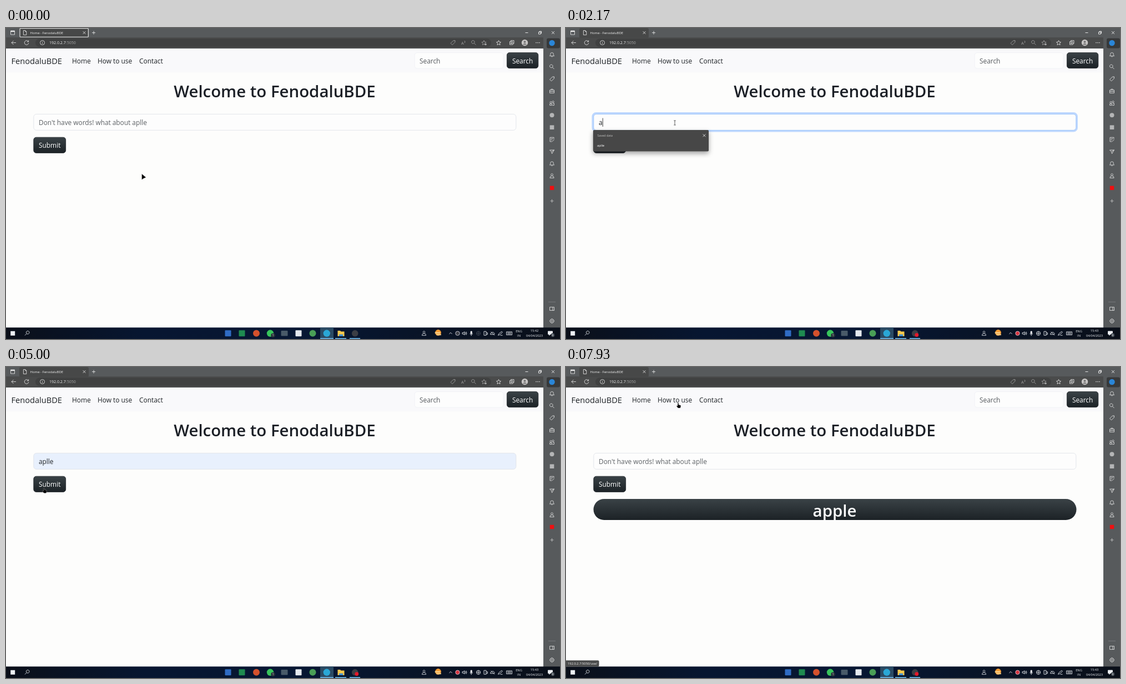
These frames come from a looping animation (998 px wide and 561 px high, 8 s). An HTML page:

```html
<!DOCTYPE html>
<html lang="en">
<head>
<meta charset="utf-8">
<title>Spelling page</title>
<style>
html, body { margin: 0; width: 100%; height: 100%; overflow: hidden; background: #fdfdfc; }
svg { display: block; width: 100%; height: 100%; }
text { font-family: "Open Sans", "Noto Sans", sans-serif; white-space: pre; }
</style>
</head>
<body>
<svg id="stage" viewBox="0 0 998 561">
  <defs>
    <linearGradient id="dark" x2="0" y2="1">
      <stop stop-color="#3a4246"/><stop offset="1" stop-color="#1c2226"/>
    </linearGradient>
    <linearGradient id="bar">
      <stop stop-color="#0a0f19"/><stop offset=".25" stop-color="#071631"/>
      <stop offset=".55" stop-color="#071733"/><stop offset="1" stop-color="#0a0f18"/>
    </linearGradient>
    <filter id="shadow" x="-10%" y="-20%" width="120%" height="150%">
      <feDropShadow dx="0" dy="4" stdDeviation="4" flood-opacity=".36"/>
    </filter>
  </defs>
  <g id="page"></g>
  <g id="chrome"></g>
  <g id="over"></g>
</svg>
<script>
const LOOP = 8000;
const SITE = "FenodaluBDE", HOST = "192.0.2.7", PORT = ":5050";
const FOCUS = 1035, TYPE = 2060, PICK = 3690, BLUR = 4700, RELOAD = 5350;
const FRAME = "#575a5c";
const $ = id => document.getElementById(id);

// Markup helpers
const rect = (x, y, w, h, fill, rx = 0, more = "") =>
  `<rect x="${x}" y="${y}" width="${w}" height="${h}" rx="${rx}" fill="${fill}" ${more}/>`;
const disc = (x, y, r, fill, more = "") => `<circle cx="${x}" cy="${y}" r="${r}" fill="${fill}" ${more}/>`;
const text = (x, y, size, fill, str, more = "") =>
  `<text x="${x}" y="${y}" font-size="${size}" fill="${fill}" ${more}>${str}</text>`;
const icon = (x, y, d, color = "#e4e4e4", more = "") =>
  `<path transform="translate(${x} ${y})" d="${d}" fill="none" stroke="${color}" stroke-width=".85" stroke-linejoin="round" ${more}/>`;
const mid = 'text-anchor="middle"';
const bold = 'text-anchor="middle" font-weight="600"';
const button = (x, y, w, label) =>
  rect(x, y, w, 28.2, "url(#dark)", 4.6, 'stroke="#1d2226" stroke-width=".8"') +
  text(x + w / 2, y + 19.2, 11.9, "#fff", label, mid);

// Small line drawings, centred on 0,0
const ring = r => `M${-r} 0a${r} ${r} 0 1 0 ${2 * r} 0a${r} ${r} 0 1 0 ${-2 * r} 0`;
const I = {
  cross: "M-2.4-2.4L2.4 2.4M2.4-2.4L-2.4 2.4",
  plus: "M-3 0H3M0-3V3",
  box: "M-3.5-3.5H3.5V3.5H-3.5Z",
  back: "M4 0H-4M-.5-3.5L-4 0L-.5 3.5",
  reload: "M3.4-1.8A3.8 3.8 0 1 0 3.8.6M3.6-4.2V-1.6H1",
  info: ring(4) + "M0-.5V2M0-2.2V-1.4",
  tag: "M-4 1L1-4H4V-1L-1 4ZM2.2-2.4v.6",
  lens: "M-1.2-4a2.8 2.8 0 1 0 .01 0M.8.8L4 4",
  star: "M0-4L1.2-1.3L4-1L2 1L2.5 4L0 2.5L-2.5 4L-2 1L-4-1L-1.2-1.3Z",
  bell: "M-4 2.2H4L2.8.5V-1A2.8 2.8 0 0 0-2.8-1V.5ZM-1 3.6H1",
  kit: "M-4-1.8H4V3.5H-4ZM-1.6-1.8V-3.5H1.6V-1.8M-4 .8H4",
  people: "M-3.8 3.8V1H-.2V3.8ZM-2-3a1.5 1.5 0 1 0 .01 0M.8 3.8H3.8V0H1.4M2-4a1.5 1.5 0 1 0 .01 0",
  edit: "M3.5-1V-3.8H-3.5V3.8H0M-2-1.5H2M-2 .8H0M4 0L.5 3.6",
  plane: "M-4-2.8L4-3L0 3.8L-1 .4ZM-1 .4L4-3",
  person: "M0-4a1.8 1.8 0 1 0 .01 0M-3.6 3.8Q-3.6 0 0 0T3.6 3.8Z",
  panel: "M-4-3H4V3H-4ZM1.4-3V3",
  gear: ring(3.5) + ring(1.3) + "M0-4.5V-3.5M0 3.5V4.5M-4.5 0H-3.5M3.5 0H4.5",
  trash: "M-4-3H4M-3-3L-2.5 4H2.5L3-3M-1.2-3V-4.3H1.2V-3M-.9-1V2M.9-1V2",
  sheet: "M-2.6-4H.8L2.8-2V4H-2.6ZM.8-4V-2H2.8",
  copies: "M-3.5-2H2V3.5H-3.5ZM-1.5-2V-4H4V1.5H2M-.8-1V2.5M-2.5.8H1",
  speaker: "M-4-1.2H-2L0-3V3L-2 1.2H-4ZM1.5-1.8Q3 0 1.5 1.8M2.8-3Q5.2 0 2.8 3",
  globe: ring(3.6) + "M-3.6 0H3.6M0-3.6V3.6",
  cloud: "M-4 2H3Q5 .5 2.5-.8Q1-3.5-1.5-1.2Q-4-1-4 2ZM-3-3L3.5 3.5",
  pen: "M-4 3.5L-2.5.5L2.5-3.5L4-2L-1 2.5ZM0 3.5H4",
  keys: "M-5-2.8H5V2.8H-5ZM-3.5-1H3.5M-3.5 1H3.5",
  note: "M-4-3.5H4V2H0L-2 4V2H-4Z"
};

function drawPage() {
  const ink = "#1d2125", nav = (x, s) => text(x, 63.8, 11.9, ink, s);
  $("page").innerHTML =
    rect(0, 36, 969, 505, "#fdfdfc") + rect(0, 36, 969, 44.5, "#f9f9fb") +
    text(9.5, 64.8, 14.6, ink, SITE) +
    nav(119, "Home") + nav(165, "How to use") + nav(240, "Contact") +
    rect(736, 44.5, 160, 28.5, "#fdfdfd", 5, 'stroke="#eeeff4" stroke-width=".8"') +
    text(745, 63.8, 11.9, "#55595d", "Search") + button(902.4, 44.4, 56.4, "Search") +
    text(484, 124.7, 29.4, "#1b1f26", "Welcome to " + SITE, bold) +
    button(49.8, 197.2, 57.8, "Submit") +
    `<g id="result">` + rect(49.5, 238, 870, 38, "url(#dark)", 19) +
    text(484, 270, 29.4, "#fdfdfd", "apple", bold) + `</g>` +
    `<rect id="glow" x="48.2" y="153.7" width="872" height="32.2" rx="6" fill="none" stroke="#bdd7fe" stroke-width="3.4"/>` +
    `<rect id="field" x="49.8" y="155.4" width="869" height="29" rx="5" stroke-width=".8"/>` +
    `<text id="value" x="59" y="175" font-size="11.85"></text>` +
    rect(0, 162.5, 0.8, 15.5, "#111", 0, 'id="caret"');
}

function drawTop() {
  const light = "#e8e8e8", dim = "#a2a2a2";
  return rect(0, 0, 998, 37, FRAME) + rect(0, 17, 968, 19.6, "#4a4b4b") +
    rect(24, 0, 125, 18, "#474848", 3) +
    rect(25, .7, 123.3, 15.6, "none", 1, 'id="tabLine" stroke="#f4f4f4" stroke-width="1.1"') +
    icon(12, 8.5, I.box, light) + rect(8.5, 5, 7, 2, light) + icon(34, 8.5, I.sheet, light) +
    text(43.5, 10.6, 6, "#f3f3f3", "Home - " + SITE) +
    icon(141, 8.5, I.cross, light) + icon(158, 8.5, I.plus, light) +
    icon(938, 8.5, "M-2.5 0H2.5", "#fff") +
    icon(962, 8.5, "M-2.5-1.2H1.2V2.5H-2.5ZM-1-1.2V-2.5H2.5V1H1.2", "#fff") + icon(985.5, 8.5, I.cross, "#fff") +
    rect(53, 19.2, 821, 15, "#404141", 7.5) +
    icon(14, 26.5, I.back, light) + icon(37, 26.5, I.reload, light) + icon(65.5, 26.5, I.info, light) +
    text(78, 29.2, 7.05, "#f2f2f2", `${HOST}<tspan fill="#aaa">${PORT}</tspan>`) +
    icon(805, 26.5, I.tag, dim) + text(820, 29.5, 7.5, dim, "A") + icon(827, 25, "M-1-2Q1 0-1 2", dim) +
    icon(842.5, 26.5, I.lens, dim) + icon(861, 26.5, I.star, dim) + disc(864, 29.5, 1.8, dim) +
    icon(887.5, 26.5, I.star, light) + icon(911, 26.5, I.copies, light) +
    disc(934.5, 26.5, 5.7, "#c9c7c6") + disc(934.5, 25, 2, "#777") +
    `<path d="M930.8 30.2Q934.5 25.5 938.2 30.2Z" fill="#777"/>` +
    [955, 958, 961].map(x => disc(x, 26.5, .8, light)).join("");
}

function drawSide() {
  const names = ["bell", "lens", "tag", "kit", "people", 0, 0, "edit", "plane", "bell", "person"];
  return rect(968, 36, 30, 505, FRAME) + rect(974, 18.5, 24, 18, "#37393a", 3) +
    disc(983.5, 27, 5.2, "#2a86d8") +
    names.map((n, i) => n ? icon(983.5, 48.2 + i * 21.85, I[n]) : "").join("") +
    disc(983.5, 157.3, 4, "#b4b5b6") + rect(979.7, 175.4, 7.6, 7.6, "#b4b5b6") +
    rect(979.8, 284.8, 7.4, 7.4, "#f00f10") +
    icon(983.5, 312, I.plus, "#c4c4c4") + rect(977, 493.8, 13, .7, "#85888a") +
    icon(983.5, 506.5, I.panel) + icon(983.5, 528.5, I.gear);
}

function drawTaskbar() {
  const y = 550.8, white = "#eef1f5", tile = (x, c) => rect(x - 5.5, y - 5.5, 11, 11, c, 1);
  const label = (x, y, s, id = "") => text(x, y, 5.7, white, s, `${mid} ${id && `id="${id}"`}`);
  return rect(0, 540.3, 998, 20.7, "url(#bar)") +
    rect(566, 540.3, 24, 20.7, "#2b4b64") +
    [[566, 24], [593, 20], [619, 19]].map(([x, w]) => rect(x, 559.3, w, 1.7, "#69b3e4")).join("") +
    rect(8.2, 546.8, 8, 8, white) + icon(38, 550.5, "M1.2-4a2.8 2.8 0 1 0 .01 0M-.8.8L-4 4", white) +
    tile(400, "#2f6cc4") + tile(425, "#1e8b50") + disc(451, y, 6, "#d4512c") +
    disc(476, y, 6.2, "#37c45b") + disc(481, 554.3, 3.8, "#2b343b") + text(481, 556.2, 5.3, "#fff", "1", mid) +
    rect(495.5, 546, 12, 9.5, "#495a68", 1) + tile(527, "#e5e9ee") +
    disc(552.5, y, 6, "#4a9f56") + disc(577.8, y, 6.2, "#2aa7d6") +
    `<path d="M597.5 546h4.5l1.5 1.5h6v8.5h-12z" fill="#f6c84c"/>` + rect(600, 552.6, 7, 3.4, "#428fd2") +
    disc(628.7, y, 5.8, "#3b3e45") + disc(631.8, 553.7, 3.4, "#e3182b", 'id="rec"') +
    icon(753, y, I.person, white, 'opacity=".9"') +
    disc(778.5, 549.5, 5.4, "#f59b32") + rect(772.5, 548.7, 10, 2.2, "#f8d28e", 1.1) + rect(775, 552.2, 9, 2, "#f8d28e", 1) +
    icon(801, y, "M-2.6 1.2L0-1.4L2.6 1.2", white) +
    disc(813.5, y, 3.7, "#3b3e45", 'id="tray" stroke="#dde" stroke-width=".8"') +
    icon(826, y, I.speaker, white) + rect(836.6, 546.4, 3.2, 5.8, white, 1.6) +
    icon(838.2, y, "M-2.6.4Q0 4.5 2.6.4M0 2.4V4.4", white) +
    `<g id="net">` + icon(851, y, I.globe, white) + `</g>` +
    icon(864, y, "M-3-3.5H1V3.5H-3ZM1-1H3.5V2H1", white) + icon(876.5, y, I.cloud, white) +
    icon(890.5, y, I.pen, white) + icon(906.5, y, I.keys, white) +
    label(924, 548.6, "ENG") + label(924, 557.2, "IN") +
    label(952, 548.4, "15:42", "clock") + label(952, 557.2, "04/04/2023") +
    icon(980.5, 550.5, I.note, white, 'style="fill:#eef1f5"') +
    disc(985, 554, 3.4, "#3a424b") + text(985, 556, 5.2, "#fff", "6", mid);
}

function drawOver() {
  $("over").innerHTML =
    `<g id="tip">` + rect(24, 18.5, 145.5, 28.5, "#4a4a4a", 2, 'filter="url(#shadow)"') +
    text(28.5, 27.4, 6, "#fff", "Home - " + SITE) + icon(33, 38, I.sheet, "#fff") +
    text(41, 40.5, 5.9, "#fff", HOST + PORT) + `</g>` +
    `<g id="list">` + rect(48.8, 184, 208.3, 127, "#474746", 2, 'id="listBox" filter="url(#shadow)"') +
    text(56.5, 196, 5.4, "#c4c4c2", "Saved data") + icon(249, 193.8, I.cross, "#eee") +
    `<g id="hover">` + rect(53.5, 203, 181.5, 18, "#6b6b6d", 1.5) + rect(53.5, 220.3, 181.5, .9, "#77749c") +
    icon(245.3, 211.8, I.trash, "#ddd") + `</g>` +
    ["aplle", "baal", "beel", "gadha", "cta", "dgo"].map((w, i) =>
      text(56, 214 + i * 17.65, 5.9, "#fff", w, i ? 'class="rest"' : "")).join("") + `</g>` +
    `<g id="status">` + rect(-3, 529.3, 62.5, 11, "#4b4c4c", 2) +
    text(3, 537, 5.8, "#f0f0f0", HOST + PORT + "/use/") + `</g>` +
    `<g id="arrow"><path d="M0 0V10.8L2.8 8.7L7.8 6.6Z" fill="#050505" stroke="#fff" stroke-width=".4"/></g>` +
    `<g id="beam">` + icon(0, 0, "M-1.8-4H1.8M0-4V4M-1.8 4H1.8", "#444") + `</g>` +
    `<g id="hand"><path d="M-.9.8Q0-.6.9.8V3.4L4.4 4.4Q5.2 4.8 4.8 6.4L4 9.6H-.4L-3 5.8Q-2.6 4.6-.9 5.6Z" fill="#050505" stroke="#fff" stroke-width=".3"/></g>`;
}

// Pointer stops: time, x, y
const TRACK = [
  [0, 244.5, 263], [250, 244.5, 263], [900, 196, 171], [3000, 196, 171], [3560, 71.5, 213],
  [4150, 71.5, 213], [4500, 68.5, 218], [5500, 68.5, 218], [6150, 362.5, 262],
  [6700, 362.5, 262], [7800, 202, 64.5], [LOOP, 202, 64.5]
];
const ramp = (t, from, len) => Math.min(1, Math.max(0, (t - from) / len));

function pointer(t) {
  const i = TRACK.findIndex(p => p[0] > t);
  const [t0, x0, y0] = TRACK[i - 1], [t1, x1, y1] = TRACK[i];
  const u = (t - t0) / (t1 - t0), k = u * u * (3 - 2 * u);
  return [x0 + (x1 - x0) * k, y0 + (y1 - y0) * k];
}

const set = (id, name, value) => $(id).setAttribute(name, value);
const fade = (id, a) => set(id, "opacity", +a);

function render(t) {
  const [x, y] = pointer(t);
  const over = (l, top, r, b) => x > l && x < r && y > top && y < b;

  const listAlpha = t < FOCUS ? 0 : 1 - ramp(t, PICK, 240);
  const hover = listAlpha > 0 && t > TYPE && over(50, 203, 235, 222);
  const filtered = t >= TYPE;
  fade("list", listAlpha);
  fade("hover", hover);
  set("listBox", "height", filtered ? 38.5 : 127);
  document.querySelectorAll(".rest").forEach(e => e.setAttribute("opacity", filtered ? 0 : 1));

  const filled = t < RELOAD && (hover || t >= PICK);
  const value = filled ? "aplle" : filtered && t < RELOAD ? "a" : "";
  const glow = ramp(t, 1065, 150) - ramp(t, BLUR, 150);
  $("value").textContent = value || "Don't have words! what about aplle";
  set("value", "fill", value ? "#212529" : "#5c6064");
  set("field", "fill", filled ? "#e8f0fd" : "#fdfdfd");
  set("field", "stroke", glow > .5 ? "#8bbafc" : "#dee1e8");
  fade("glow", glow);

  const since = t - (t >= PICK ? PICK : t >= TYPE ? TYPE : FOCUS);
  fade("caret", t >= FOCUS && t < BLUR && since % 1060 < 530);
  set("caret", "x", value === "a" ? 65.8 : value ? 85.4 : 59.2);

  fade("result", t >= RELOAD);
  fade("tabLine", t < FOCUS);
  fade("tip", ramp(t, 500, 120) - ramp(t, 1015, 90));
  fade("rec", t >= 400);
  fade("net", t < 400 ? .25 : 1);
  set("tray", "fill", t < 400 ? "#3b3e45" : "#d5323d");
  $("clock").textContent = t < 1900 ? "15:42" : "15:43";

  const link = over(165, 48, 228, 72);
  fade("status", link);
  const kind = over(50, 156, 919, 184) ? "beam"
    : link || (!listAlpha && over(50, 197, 108, 226)) ? "hand" : "arrow";
  for (const id of ["arrow", "beam", "hand"]) {
    fade(id, id === kind);
    set(id, "transform", `translate(${x} ${y})`);
  }
}

drawPage();
$("chrome").innerHTML = drawTop() + drawSide() + drawTaskbar();
drawOver();
const start = performance.now();
(function tick() {
  render((performance.now() - start) % LOOP);
  requestAnimationFrame(tick);
})();
</script>
</body>
</html>
```
